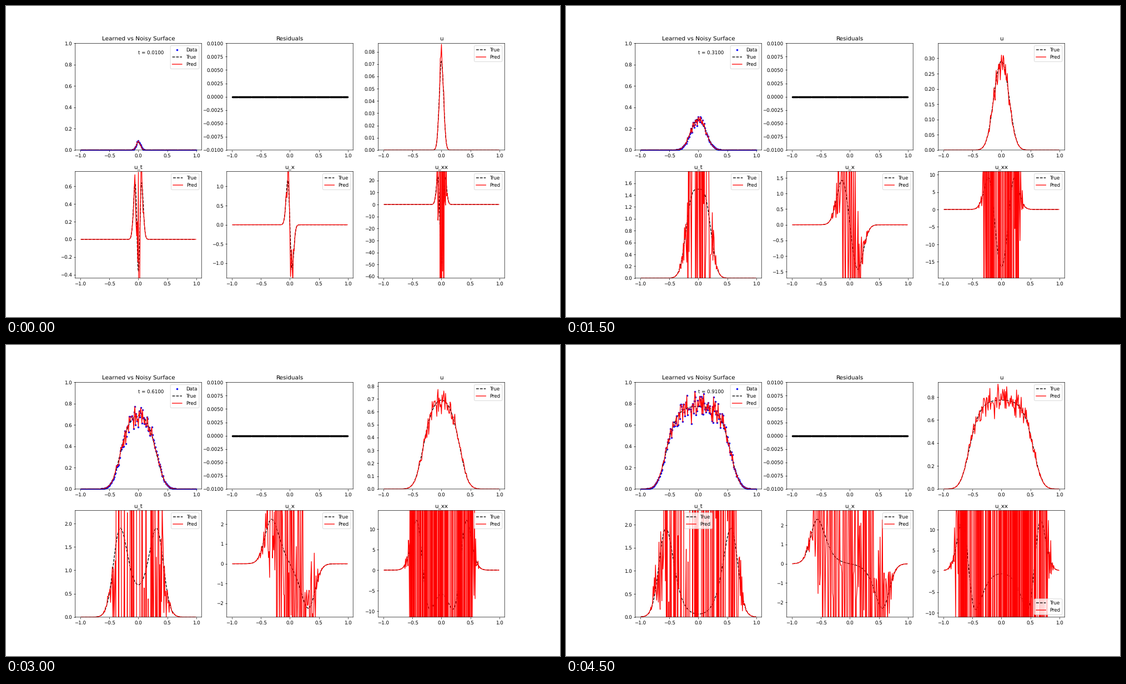
These frames come from a looping animation (998 by 561 pixels, 5000 ms). A matplotlib script:

```python
import numpy as np
import matplotlib.pyplot as plt
from matplotlib.animation import FuncAnimation

DPI = 62.375
FRAMES, INTERVAL = 10, 500

# Logistic growth with diffusion: u_t = D u_xx + R u (1 - u / K)
D, R, K = 0.02, 10.0, 0.782
X = np.linspace(-0.99, 0.99, 397)
DX = X[1] - X[0]
DT = 2.5e-4

# Samples sit on every second grid point
STEP = 2
XD = X[::STEP]
H = DX * STEP
NOISE = 0.09

# Soft, unsnapped rendering of thin lines and text
plt.rcParams.update({"path.snap": False, "text.hinting": "no_hinting"})


def laplacian(u):
    p = np.pad(u, 1, mode="edge")
    return (p[2:] - 2 * u + p[:-2]) / DX**2


def rate(u):
    return D * laplacian(u) + R * u * (1 - u / K)


def solve():
    u = 0.0782 * np.exp(-X**2 / (2 * 0.001))
    rows = []
    for k in range(FRAMES):
        for _ in range(round((0.1 if k else 0.01) / DT)):
            u = u + DT * rate(u)
        rows.append(u)
    return rows


def slopes(u):
    """First and second derivative by fourth-order differences."""
    p = np.pad(u, 2, mode="edge")
    a, b, c, d = p[:-4], p[1:-3], p[3:-1], p[4:]
    return ((a - 8 * b + 8 * c - d) / (12 * H),
            (-a + 16 * b - 30 * u + 16 * c - d) / (12 * H * H))


def sample(k, u):
    """Noisy samples of u and the derivatives of their interpolant."""
    rng = np.random.default_rng(40 + k)
    ud = u[::STEP]
    # noise grows with u and fades out in the tails
    sd = NOISE * ud**2 / (ud + 0.05 * ud.max())
    data = ud + sd * np.clip(rng.standard_normal(ud.size), -2.4, 2.4)
    ut = rate(u)[::STEP] + 1.5 * sd / 0.01 * rng.standard_normal(ud.size)
    return data, ut, *slopes(data)


TRUE = solve()
PRED = [sample(k, u) for k, u in enumerate(TRUE)]

fig, axes = plt.subplots(2, 3, figsize=(998 / DPI, 561 / DPI), dpi=DPI)
fig.subplots_adjust(left=0.125, right=0.9, bottom=0.125, top=0.88,
                    wspace=0.2, hspace=0.2)
axes = axes.ravel()


def curves(ax, true, pred, title, loc="upper right"):
    ax.plot(X, true, "k--", label="True")
    ax.plot(XD, pred, "r-", label="Pred")
    ax.set_title(title)
    ax.legend(loc=loc)


def fit_y(ax, y):
    low, high = 1.2 * y.min(), 1.2 * y.max()
    ax.set_ylim(0 if abs(low) < 0.005 * high else low, high)


def draw(k):
    for ax in axes:
        ax.clear()
    u = TRUE[k]
    data, ut, ux, uxx = PRED[k]

    ax = axes[0]
    ax.plot(XD, data, "b.", label="Data")
    curves(ax, u, data, "Learned vs Noisy Surface")
    ax.text(0.5, 0.9, f"t = {0.01 + 0.1 * k:.4f}", transform=ax.transAxes)
    ax.set_ylim(0, 1)

    axes[1].plot(XD, 0 * XD, "k.")
    axes[1].set_title("Residuals")
    axes[1].set_ylim(-0.01, 0.01)

    # legends give way once the wide front reaches the corner
    ut_loc = "upper center" if k > 7 else "upper right"
    uxx_loc = ("upper right" if k < 7 else
               "lower center" if k == 8 else "lower right")
    panels = [
        (u, data, "u", "upper right"),
        (rate(u), ut, "u_t", ut_loc),
        (np.gradient(u, DX), ux, "u_x", "upper right"),
        (laplacian(u), uxx, "u_xx", uxx_loc),
    ]
    for ax, (true, pred, title, loc) in zip(axes[2:], panels):
        curves(ax, true, pred, title, loc)
        fit_y(ax, true)
    return []


anim = FuncAnimation(fig, draw, frames=FRAMES, init_func=lambda: draw(0),
                     interval=INTERVAL, repeat=True, repeat_delay=0)
plt.show()
```
